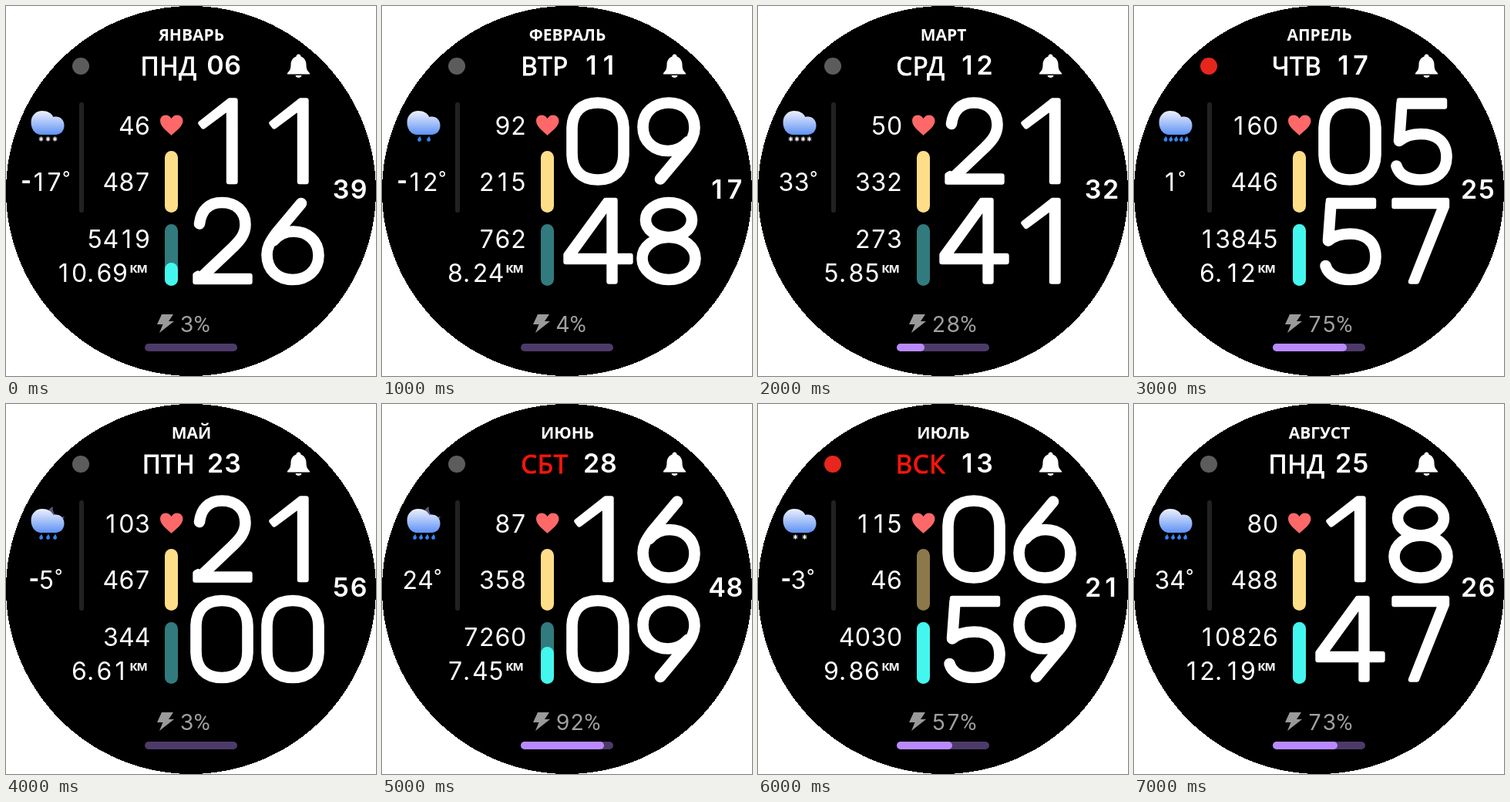
Recreate the animation shown at these times as an HTML page. Size 480 px wide and 480 px high, loop 8 s.

```html
<!DOCTYPE html>
<html lang="ru">
<head>
<meta charset="utf-8">
<title>Циферблат</title>
<style>
  html, body { margin: 0; width: 100%; height: 100%; overflow: hidden; background: #fff; }
  svg { display: block; width: 100vw; height: 100vh; }
  text { text-anchor: middle; fill: #fff; font-family: Inter, sans-serif; }
  .month { font: 600 21px "Noto Sans", sans-serif; }
  .week { font: 400 33px "Noto Sans", sans-serif; letter-spacing: .6px; stroke: #fff; stroke-width: .9; }
  .week.off { fill: #f5160c; stroke: #f5160c; }
  .bold { font-size: 34px; font-weight: 600; }
  .num { font-size: 32px; font-weight: 400; }
  .minus { font-size: 29px; font-weight: 800; }
  .deg { font-size: 23px; }
  .unit { font: 700 17px "Noto Sans", sans-serif; letter-spacing: -1.3px; fill: #eee; }
  .batt { font-size: 28.5px; font-weight: 400; fill: #a0a0a0; }
  .pct { font: 400 29px Roboto, sans-serif; fill: #a0a0a0; }
  .curve { fill: none; stroke: #fff; stroke-width: 14.6; stroke-linecap: round; stroke-linejoin: round; }
  .block { fill: #fff; fill-rule: evenodd; stroke: #fff; stroke-width: 6.4; stroke-linejoin: round; }
</style>
</head>
<body>
<svg viewBox="0 0 480 480">
  <defs>
    <linearGradient id="sky" x1="0" y1="0" x2="0" y2="1">
      <stop offset="0" stop-color="#edf1fc"/>
      <stop offset="1" stop-color="#5f92f5"/>
    </linearGradient>
  </defs>
  <circle cx="240" cy="240" r="240" shape-rendering="crispEdges"/>
  <rect x="95" y="125" width="6" height="143" rx="3" fill="#222"/>
  <path fill="#ff6868" d="M214.500 168 C211 164 200 157 200 149 C200 144.500 203 141.500 207 141.500 C210.500 141.500 213 143.500 214.500 146 C216 143.500 218.500 141.500 222 141.500 C226 141.500 229.500 144.500 229.500 149 C229.500 157 218 164 214.500 168Z"/>
  <path fill="#fff" d="M379.500 62.500 C381.500 62.500 382.500 64 382.500 65.500 C387 67 389.500 71 389.500 76 C389.500 82 391 84 394 87 V88.500 H365 V87 C368 84 369.500 82 369.500 76 C369.500 71 372 67 376.500 65.500 C376.500 64 377.500 62.500 379.500 62.500Z M375.500 90 H383.500 C383 94 376 94 375.500 90Z"/>
  <path fill="#9a9a9a" d="M202 400 H217 L211 409 H218 L199 424 L203.500 413 H196Z"/>
  <text class="unit" x="171.500" y="346">км</text>
  <g id="face"></g>
</svg>
<script>
const STEP = 1000;

// month, weekday, day, time, seconds, link, precipitation, count, moon,
// temperature, pulse, calories, steps, step level, km, battery
const STATES = [
  ["ЯНВАРЬ", "ПНД", "06", "1126", "39", 0, "snow", 3, 0, "-17", "46", "487", "5419", .375, "10.69", 3],
  ["ФЕВРАЛЬ", "ВТР", "11", "0948", "17", 0, "rain", 2, 0, "-12", "92", "215", "762", 0, "8.24", 4],
  ["МАРТ", "СРД", "12", "2141", "32", 0, "snow", 4, 0, "33", "50", "332", "273", 0, "5.85", 28],
  ["АПРЕЛЬ", "ЧТВ", "17", "0557", "25", 1, "rain", 5, 0, "1", "160", "446", "13845", 1, "6.12", 75],
  ["МАЙ", "ПТН", "23", "2100", "56", 0, "rain", 3, 1, "-5", "103", "467", "344", 0, "6.61", 3],
  ["ИЮНЬ", "СБТ", "28", "1609", "48", 0, "rain", 4, 1, "24", "87", "358", "7260", .6, "7.45", 92],
  ["ИЮЛЬ", "ВСК", "13", "0659", "21", 1, "snow", 2, 0, "-3", "115", "46", "4030", 1, "9.86", 57],
  ["АВГУСТ", "ПНД", "25", "1847", "26", 0, "rain", 4, 0, "34", "80", "488", "10826", 1, "12.19", 73]
];

const curve = d => `<path class="curve" d="${d}"/>`;
const block = d => `<path class="block" d="${d}"/>`;
const six = curve("M56 8.500 L23 48 C15 59 11.500 66 11.500 75 C11.500 95 26 107.500 45 107.500 C64 107.500 78.500 95 78.500 76 C78.500 57 64 45 46 45 C35 45 26 50 20 57");
const BIG = {
  0: curve("M45 7.500 C67 7.500 78 21 78.500 40 V75 C78 94 67 107.500 45 107.500 C23 107.500 12 94 11.500 75 V40 C12 21 23 7.500 45 7.500Z"),
  1: block("M62.500 4.500 H55 L17.500 34 L21 38.500 L54 14 V110 H62.500Z"),
  2: curve("M16 35 C18 18 28 7.500 45 7.500 C64 7.500 75.500 19 75.500 36 C75.500 49 68 57 60 65 L20 103") + block("M10.500 101 L14 99 L18 102.500 H81.500 V110.500 H10.500Z"),
  4: block("M67.500 4.500 V76.500 H87.500 V84.500 H67.500 V110 H59.500 V84.500 H3.500 V75 L55 4.500Z M59.500 76.500 H12.500 L59.500 11.700Z"),
  5: curve("M20.500 9 L17 57 C24 51 33 48 45 48 C65 48 78.500 58 78.500 78 C78.500 97 65 107.500 45 107.500 C28 107.500 17 101 13.500 89.500") + block("M17 4.500 H76 V12.500 H17Z"),
  6: six,
  7: block("M10.500 4.500 H79 V13 L40 110 H32 L70.500 12.500 H10.500Z"),
  8: curve("M15 30 a30 22.500 0 1 0 60 0 a30 22.500 0 1 0 -60 0Z M10.500 80 a34.500 27.500 0 1 0 69 0 a34.500 27.500 0 1 0 -69 0Z"),
  9: `<g transform="rotate(180 45 57.500)">${six}</g>`
};

const text = (s, x, y, cls) => `<text class="${cls}" x="${x}" y="${y}">${s}</text>`;
const rect = (x, y, w, h, r, fill) => `<rect x="${x}" y="${y}" width="${w}" height="${h}" rx="${r}" fill="${fill}"/>`;

// Evenly spaced digits; x is the centre of the first one.
const digits = (s, x, y, pitch, cls) =>
  [...s].map((c, i) => text(c, x + i * pitch, y, cls)).join("");
const digitsTo = (s, x, y, pitch = 20.6) =>
  digits(s, x - (s.length - 1) * pitch, y, pitch, "num");

function distance(s) {
  const [whole, part] = s.split(".");
  return digitsTo(whole, 95, 358) + text(".", 109.5, 358, "num") + digitsTo(part, 148, 358);
}

function temperature(s) {
  const width = c => c === "-" ? 12 : c === "°" ? 11 : 20.3;
  const chars = [...s, "°"];
  let x = 52 - chars.reduce((sum, c) => sum + width(c), 0) / 2;
  return chars.map(c => {
    const mid = x + width(c) / 2;
    x += width(c);
    if (c === "-") return text(c, mid, 237, "minus");
    return c === "°" ? text(c, mid, 231, "deg") : text(c, mid, 240, "num");
  }).join("");
}

function weather(kind, count, moon) {
  const gap = { 2: 12, 3: 9, 4: 8, 5: 6.8 }[count];
  let out = moon ? '<path fill="#5a5478" d="M61 133 C59 141 66 149 76 146 C73 153 64 156 58 152 C51 147 53 136 61 133Z"/>' : "";
  out += '<path fill="url(#sky)" d="M44 167 C37 166 32.500 159 32.500 151 C32.500 142 39 136 47 136 C54 136 59 139 61.500 144 C69 142 75.500 147 75.500 155 C75.500 162 71 167 64 167Z"/>';
  for (let i = 0; i < count; i++) {
    const x = 54.5 + (i - (count - 1) / 2) * gap;
    out += kind === "rain"
      ? `<path fill="#3284f2" d="M${x + .8} 169 c1.500 3 2 4 1.500 5.200 c-1 2.600 -4.600 2 -4.600 -.8 c0 -1.500 1.500 -3 3.100 -4.400Z"/>`
      : `<path stroke="#fff" stroke-width="1.300" d="M${x} 169.500 v6 m-2.600 -4.500 l5.200 3 m0 -3 l-5.200 3"/>`;
  }
  return out;
}

function battery(n) {
  const s = String(n);
  const fill = Math.round(n / 10) * 12;
  return digits(s, 234.5, 422.5, 18.7, "batt") + text("%", 235.5 + s.length * 18.7, 422.5, "pct") +
    rect(180, 438, 120, 10, 5, "#4d3a68") + (fill ? rect(180, 438, fill, 10, 5, "#b98aff") : "");
}

function clock(s) {
  return [...s].map((c, i) =>
    `<g transform="translate(${235 + i % 2 * 92} ${i < 2 ? 118 : 247.5})">${BIG[c]}</g>`).join("");
}

function draw([month, week, day, time, sec, link, kind, count, moon, temp, pulse, cal, steps, level, km, power]) {
  const dayOff = week === "СБТ" || week === "ВСК";
  const done = level * 80;
  return text(month, 240.5, 45, "month") +
    text(week, 211, 89.5, dayOff ? "week off" : "week") +
    digits(day, 271.5, 89, 22.5, "bold") +
    `<circle cx="97" cy="78" r="11" fill="${link ? "#e8261e" : "#5c5c5c"}"/>` +
    weather(kind, count, moon) + temperature(temp) +
    digitsTo(pulse, 177, 167) + digitsTo(cal, 177, 240) +
    digitsTo(steps, 177, 314) + distance(km) +
    rect(206, 188, 17, 80, 8.5, cal < 100 ? "#8c784a" : "#ffde89") +
    rect(206, 283, 17, 80, 8.5, "#317b7f") +
    (done ? rect(206, 363 - done, 17, done, 8.5, "#43f7ee") : "") +
    clock(time) + digits(sec, 434.5, 249.5, 23, "bold") + battery(power);
}

const face = document.getElementById("face");
let shown = -1;
function tick() {
  const i = Math.floor(performance.now() / STEP) % STATES.length;
  if (i !== shown) {
    face.innerHTML = draw(STATES[i]);
    shown = i;
  }
  requestAnimationFrame(tick);
}
tick();
</script>
</body>
</html>
```
